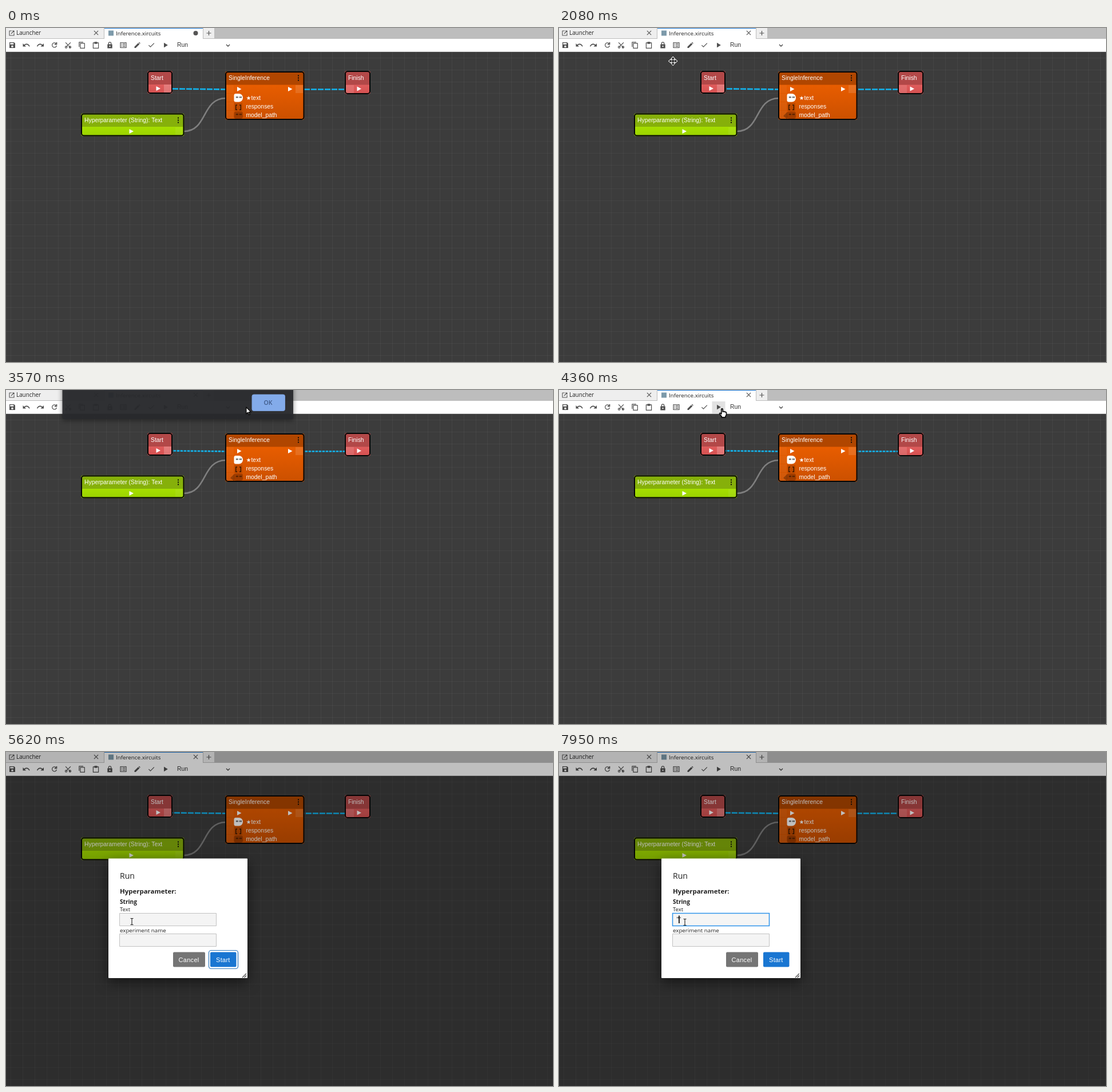
Animation, 956 px wide and 585 px high, one loop 8000 ms. Source, as an HTML page with a canvas:

```html
<!DOCTYPE html>
<html lang="en">
<head>
<meta charset="utf-8">
<title>Workflow editor</title>
<style>
html, body { margin: 0; width: 100%; height: 100%; overflow: hidden; background: #3c3c3c; }
canvas { display: block; width: 956px; height: 585px; }
</style>
</head>
<body>
<canvas id="stage" width="956" height="585"></canvas>
<script>
const LOOP = 8000, W = 956, H = 585;
const c = document.getElementById('stage').getContext('2d');
const UI = '"Open Sans", "Noto Sans", sans-serif';
const ARIAL = '"Liberation Sans", Arial, sans-serif';

const SAVED = 1850, ALERT_IN = 2690, ALERT_OUT = 3530, DIALOG = 4500, FOCUS = 5800;
const QUOTE1 = 7400, QUOTE2 = 7560, LEFT = 7880;

// Pointer stops: time, x, y
const route = [
  [70, 788, 522], [200, 735, 450], [480, 560, 262], [760, 420, 160], [870, 403, 150],
  [950, 403, 150], [1250, 210, 92], [1600, 11, 32], [1900, 11, 32], [2080, 199, 58],
  [2300, 254, 33], [2760, 254, 33], [3250, 452, 25], [3500, 450, 25], [3570, 420, 30],
  [4150, 285, 33], [4600, 285, 33], [5150, 222, 290], [5400, 220, 297], [6450, 220, 297], [6500, 220, 298]
];

function rect(x, y, w, h, fill) {
  c.fillStyle = fill;
  c.fillRect(x, y, w, h);
}

function round(x, y, w, h, r, fill, stroke, lw = 1) {
  c.beginPath();
  c.roundRect(x, y, w, h, r);
  if (fill) { c.fillStyle = fill; c.fill(); }
  if (stroke) { c.strokeStyle = stroke; c.lineWidth = lw; c.stroke(); }
}

function text(s, x, y, size, font, color, weight = 400, spacing = 0) {
  c.font = `${weight} ${size}px ${font}`;
  c.letterSpacing = spacing + 'px';
  c.fillStyle = color;
  c.fillText(s, x, y);
  c.letterSpacing = '0px';
}

function draw(d, x, y, { fill, stroke, lw = 1.2, scale = 1 }) {
  c.save();
  c.translate(x, y);
  c.scale(scale, scale);
  const p = new Path2D(d);
  if (fill) { c.fillStyle = fill; c.fill(p, 'evenodd'); }
  if (stroke) {
    c.strokeStyle = stroke;
    c.lineWidth = lw;
    c.lineJoin = 'round';
    c.stroke(p);
  }
  c.restore();
}

function play(x, y, color = '#fff') {
  draw('M-3.5 -4L4 0L-3.5 4Z', x, y, { fill: color });
}

function kebab(x, y) {
  for (const d of [-4, 0, 4]) rect(x - 1, y + d - 1, 2, 2, '#0b0b0b');
}

const INK = '#505050';
const solid = { fill: INK }, line = { stroke: INK };
// Toolbar icons, each drawn around its own centre
const icons = [
  [11, 'M-5 -5H3L5 -3V5H-5ZM-3.8 -3.8V-1.3H2.3V-3.8ZM0 .4A1.8 1.8 0 1 0 0 4A1.8 1.8 0 1 0 0 .4Z', solid],
  [35.5, 'M-6 -3V2.5H-.5L-2.7 .3C.5 -2 3.7 -.6 4.7 2.5L6.2 2C4.6 -2.6 -.2 -4.2 -3.8 -.8Z', solid],
  [60, 'M6 -3V2.5H.5L2.7 .3C-.5 -2 -3.7 -.6 -4.7 2.5L-6.2 2C-4.6 -2.6 .2 -4.2 3.8 -.8Z', solid],
  [84.5, 'M3.2 -2.6A4 4 0 1 0 4 1M4.2 -4.6V-1.2H.8Z', line],
  [108.5, 'M-4.4 -4.6L3.8 4.2M4.4 -4.6L-3 3M-5 3.5a1.6 1.6 0 1 0 3.2 0a1.6 1.6 0 1 0 -3.2 0M1.8 3.5a1.6 1.6 0 1 0 3.2 0a1.6 1.6 0 1 0 -3.2 0', line],
  [132.5, 'M-4.7 3V-5.2H2.5M-2.6 -3.2H4.8V5.4H-2.6Z', line],
  [157, 'M-4.6 -4.2H4.6V5.4H-4.6ZM-2 -5.2H2V-2.8H-2Z', line],
  [181.5, 'M-4.2 -1.6H-2.8V-3A2.8 2.8 0 0 1 2.8 -3V-1.6H4.2V5.6H-4.2ZM-1.6 -1.6H1.6V-3A1.6 1.6 0 0 0 -1.6 -3ZM-1 1h2v2h-2Z', solid],
  [205, 'M-5 -4.5H5V4.5H-5ZM-3.4 -2.3H-2M-1 -2.3H3.5M-3.4 0H-2M-1 0H3.5M-3.4 2.3H-2M-1 2.3H3.5', line],
  [229.5, 'M-5 5V2.8L1.6 -3.8L3.8 -1.6L-2.8 5ZM2.3 -4.4L3.3 -5.3L5.3 -3.3L4.4 -2.3Z', solid],
  [254, 'M-4.6 .2L-1.6 3.2L4.8 -3.4', line],
  [279, 'M-3 -4.2L3.8 0L-3 4.2Z', solid]
];

function cross(x, y, r) {
  draw(`M${-r} ${-r}L${r} ${r}M${r} ${-r}L${-r} ${r}`, x, y, { stroke: '#555', lw: 1.2 });
}

function drawBars(t, hover) {
  rect(0, 0, W, 19, '#bdbdbd');
  rect(0, 0, 171, 18, '#eeeeee');
  rect(345, 0, 19, 18, '#eeeeee');
  rect(172, 0, 172, 19, '#fff');
  rect(172, 0, 172, 1, '#1976d2');
  rect(0, 19, W, 23, '#fff');
  rect(0, 41, W, 1, '#cfcfcf');

  draw('M0 -4H-4V4H4V0M1 -4H4V-1M4 -4L-1 1', 10, 9, { stroke: '#555', lw: 1.1 });
  text('Launcher', 18, 12, 9.9, UI, '#222');
  cross(157.5, 8.5, 3.6);
  rect(179, 4.5, 9, 9, '#7d9aaa');
  text('Inference.xircuits', 192, 12.5, 9.8, UI, '#222');
  if (t < SAVED) {
    c.beginPath();
    c.arc(331.5, 9, 4, 0, 7);
    c.fillStyle = '#555';
    c.fill();
  } else cross(331.5, 8.5, 3.6);
  draw('M-4 0H4M0 -4V4', 354.5, 9, { stroke: '#555', lw: 1.2 });

  for (const [x, d, style] of icons) {
    if (hover === x) rect(x - 11.5, 20, 23, 21, '#e2e2e2');
    draw(d, x, 30, style);
  }
  text('Run', 299, 33, 10.4, ARIAL, '#333');
  draw('M-3 -1.5L0 1.5L3 -1.5', 388, 30.5, { stroke: '#444', lw: 1.4 });
}

function drawGrid() {
  rect(0, 42, W, H - 42, '#3c3c3c');
  const step = 125 / 6, tint = 'rgba(255,255,255,.045)';
  for (let x = 8; x < W; x += step) rect(Math.round(x), 42, 1, H, tint);
  for (let y = 52; y < H; y += step) rect(0, Math.round(y), W, 1, tint);
}

function drawLinks(t) {
  c.lineWidth = 2.6;
  c.strokeStyle = '#7f7f7f';
  c.beginPath();
  c.moveTo(311, 181);
  c.bezierCurveTo(352, 181, 342, 123, 384, 123);
  c.stroke();

  const fine = t > ALERT_IN && t < DIALOG;
  c.strokeStyle = '#12b4ee';
  c.setLineDash(fine ? [4.5, 1.5] : [10, 2]);
  c.lineDashOffset = -t * 0.024 % 24;
  for (const [x1, y1, x2, y2] of [[291, 106.5, 383, 107.5], [521, 107.5, 593, 107.5]]) {
    c.beginPath();
    c.moveTo(x1, y1);
    c.lineTo(x2, y2);
    c.stroke();
  }
  c.setLineDash([]);
}

function node(x, y, w, h, split, head, top, bottom, title) {
  const g = c.createLinearGradient(0, split, 0, y + h);
  g.addColorStop(0, top);
  g.addColorStop(1, bottom);
  c.save();
  c.beginPath();
  c.roundRect(x, y, w, h, 4);
  c.clip();
  rect(x, y, w, h, g);
  rect(x, y, w, split - y, head);
  c.restore();
  round(x + 1, y + 1, w - 2, h - 2, 4, null, '#050505', 2);
  text(title, x + 6, split - 8.5, 10.35, ARIAL, '#fff');
}

function quotes(x, y, color) {
  for (const dx of [-4, -1.7, 2, 4.3]) rect(x + dx, y - 2, 1.4, 2.5, color);
}

function drawNodes(t) {
  const glow = 'rgba(255,255,255,.12)';
  node(247, 75, 44, 40, 99, '#b24848', '#df5c5c', '#d45050', 'Start');
  rect(276, 99, 13, 14, 'rgba(255,255,255,.2)');
  play(266, 106);

  node(592, 75, 45, 41, 99.5, '#b24848', '#df5c5c', '#d45050', 'Finish');
  rect(594, 100, 14, 14, glow);
  play(617, 106.5);

  node(131, 149.5, 180.5, 40, 173, '#86b00a', '#a6df00', '#9ad200', 'Hyperparameter (String): Text');
  rect(296, 174, 13, 13, 'rgba(255,255,255,.06)');
  kebab(301, 161.5);
  play(219, 181);

  node(383, 76, 138.5, 85, 99.5, '#b04600', '#e85d00', '#cb5000', 'SingleInference');
  kebab(511, 87.5);
  rect(506, 100, 13, 14, glow);
  for (const y of [100, 115, 130, 145]) rect(385, y, 13, 14, 'rgba(255,255,255,.04)');
  play(407.5, 107);
  play(496.5, 107);
  c.beginPath();
  c.roundRect(398.5, 115, 15.5, 14.5, [3, 7, 7, 3]);
  c.fillStyle = '#fff';
  c.fill();
  quotes(406, 122, '#333');
  rect(399, 131, 14, 14, 'rgba(90,30,0,.2)');
  draw('M-2 -4H-4.3V4.3H-2M2 -4H4.3V4.3H2', 406, 139, { stroke: '#3b1800', lw: 1.4 });
  round(398.5, 146, 15.5, 13, 4, 'rgba(90,30,0,.4)');
  quotes(406, 152, '#3b1800');
  if (t > 940 && t < DIALOG) draw('M-14 2L-7 -5V8Z', 406, 152, { fill: 'rgba(80,30,0,.45)' });

  text('★', 419.5, 125.5, 10, '"DejaVu Sans", sans-serif', '#fff');
  text('text', 428.5, 125.5, 10.35, ARIAL, '#fff');
  text('responses', 419.5, 140.5, 10.35, ARIAL, '#fff');
  text('model_path', 419.5, 155.5, 10.35, ARIAL, '#fff');
}

function shadow(blur, y, color) {
  c.shadowBlur = blur;
  c.shadowOffsetY = y;
  c.shadowColor = color;
}

function drawAlert(t) {
  if (t < ALERT_IN || t > ALERT_OUT + 160) return;
  const out = Math.max(0, (t - ALERT_OUT) / 160);
  c.save();
  c.globalAlpha = Math.min(1, (t - ALERT_IN) / 130 + 0.1) * (1 - out * out);
  shadow(8, 2, 'rgba(0,0,0,.5)');
  round(98.5, -20, 403.5, 71, 3, '#292a2d');
  shadow(0, 0, 'transparent');
  round(430, 8, 57.5, 28.5, 3, '#8ab4f8', '#7da2df');
  text('OK', 450.5, 25.5, 10.5, UI, '#39527f', 600);
  c.restore();
}

function field(y, focused) {
  if (focused) round(198.5, y + .5, 169, 22, 0, '#f5f5f5', '#2f93ea', 1.5);
  else round(198.5, y + .5, 169, 22, 0, '#f4f4f4', '#c2c2c2');
}

function drawDialog(t) {
  if (t < DIALOG) return;
  const focused = t >= FOCUS;
  rect(0, 0, W, H, 'rgba(0,0,0,.25)');
  c.save();
  shadow(22, 7, 'rgba(0,0,0,.55)');
  round(179, 186.5, 243, 209.5, 1, '#fff');
  c.restore();

  text('Run', 199, 221.5, 14.1, UI, '#212121');
  text('Hyperparameter:', 199, 248, 11.45, UI, '#212121', 700);
  text('String', 199, 266, 10.1, UI, '#212121', 700);
  text('Text', 199, 279, 9.5, UI, '#212121');
  field(282, focused);
  text('experiment name', 199, 315.5, 9.75, UI, '#212121');
  field(318, false);

  round(292, 350.5, 56, 26, 2, '#757575');
  text('Cancel', 301.5, 367.5, 11, ARIAL, '#fff', 400, .3);
  round(357, 350.5, 45.5, 26, 2, '#1976d2');
  if (!focused) round(354.5, 347.5, 51, 32, 4, null, '#2a76bd', 1.2);
  text('Start', 367, 367.5, 11, ARIAL, '#fff', 400, .3);
  draw('M-7 7L0 0M-3.5 7L0 3.5', 420, 388, { stroke: '#444', lw: 1.1 });

  if (!focused) return;
  const typed = t < QUOTE1 ? '' : t < QUOTE2 ? '"' : '""';
  text(typed, 205.5, 297, 10.8, ARIAL, '#222');
  const last = [LEFT, QUOTE2, QUOTE1, FOCUS].find(k => t >= k);
  const caret = t < QUOTE1 ? 205 : t < QUOTE2 || t >= LEFT ? 209 : 213;
  if ((t - last) % 1060 < 530) rect(caret, 286.5, 1.8, 13.5, '#111');
}

function pointerAt(t) {
  if (t < route[0][0]) return null;
  let i = 0;
  while (i < route.length - 1 && route[i + 1][0] <= t) i++;
  const [t0, x0, y0] = route[i];
  const [t1, x1, y1] = route[Math.min(i + 1, route.length - 1)];
  const k = t1 > t0 ? (t - t0) / (t1 - t0) : 0;
  return [x0 + (x1 - x0) * k, y0 + (y1 - y0) * k];
}

function hoverAt(t, p) {
  const open = t > 1780 && (t < ALERT_IN || t > 3700) && t < DIALOG;
  if (!p || !open || p[1] < 20 || p[1] > 41) return null;
  const hit = icons.find(([x]) => Math.abs(p[0] - x) < 11.5);
  return hit ? hit[0] : null;
}

const ARROW = 'M0 0V12L2.8 9.4L4.8 13.6L6.6 12.8L4.8 8.8H8.6Z';
const HAND = 'M-1.2 .5Q0 -1 1.2 .5V5Q2.6 4 3.6 5.2Q5 4.4 6 5.8Q7.4 5.4 7.5 7V10.5Q7 12 6 13V15H-.8V13.4L-4.4 9Q-4.6 7 -2.8 7.6L-1.2 9Z';
const MOVE = 'M0 -7L2.6 -4H.8V-.8H4V-2.6L7 0L4 2.6V.8H.8V4H2.6L0 7L-2.6 4H-.8V.8H-4V2.6L-7 0L-4 -2.6V-.8H-.8V-4H-2.6Z';
const BEAM = 'M-2.5 -5.5H-.8L0 -5L.8 -5.5H2.5M0 -5V5M-2.5 5.5H-.8L0 5L.8 5.5H2.5';

function drawPointer(t, p) {
  if (!p) return;
  const [x, y] = p;
  const alert = t > ALERT_IN && t < 3700;
  if (t >= DIALOG) {
    if (x > 198 && x < 368 && y > 282 && y < 305) draw(BEAM, x, y, { stroke: '#222', lw: 1.1 });
    else draw(ARROW, x, y, { stroke: '#111', lw: 1.6, fill: '#fff' });
  } else if (y > 42) {
    draw(MOVE, x, y, { stroke: '#fff', lw: 2 });
    draw(MOVE, x, y, { fill: '#111' });
  } else if (!alert && y > 19) {
    draw(HAND, x, y, { stroke: '#111', lw: 1.8, fill: '#fff' });
  } else {
    draw(ARROW, x, y, { stroke: '#111', lw: 1.6, fill: '#fff' });
  }
}

function render(t) {
  const p = pointerAt(t);
  drawGrid();
  drawBars(t, hoverAt(t, p));
  drawLinks(t);
  drawNodes(t);
  drawAlert(t);
  drawDialog(t);
  drawPointer(t, p);
}

const start = performance.now();
function tick() {
  render((performance.now() - start) % LOOP);
  requestAnimationFrame(tick);
}
tick();
</script>
</body>
</html>
```
